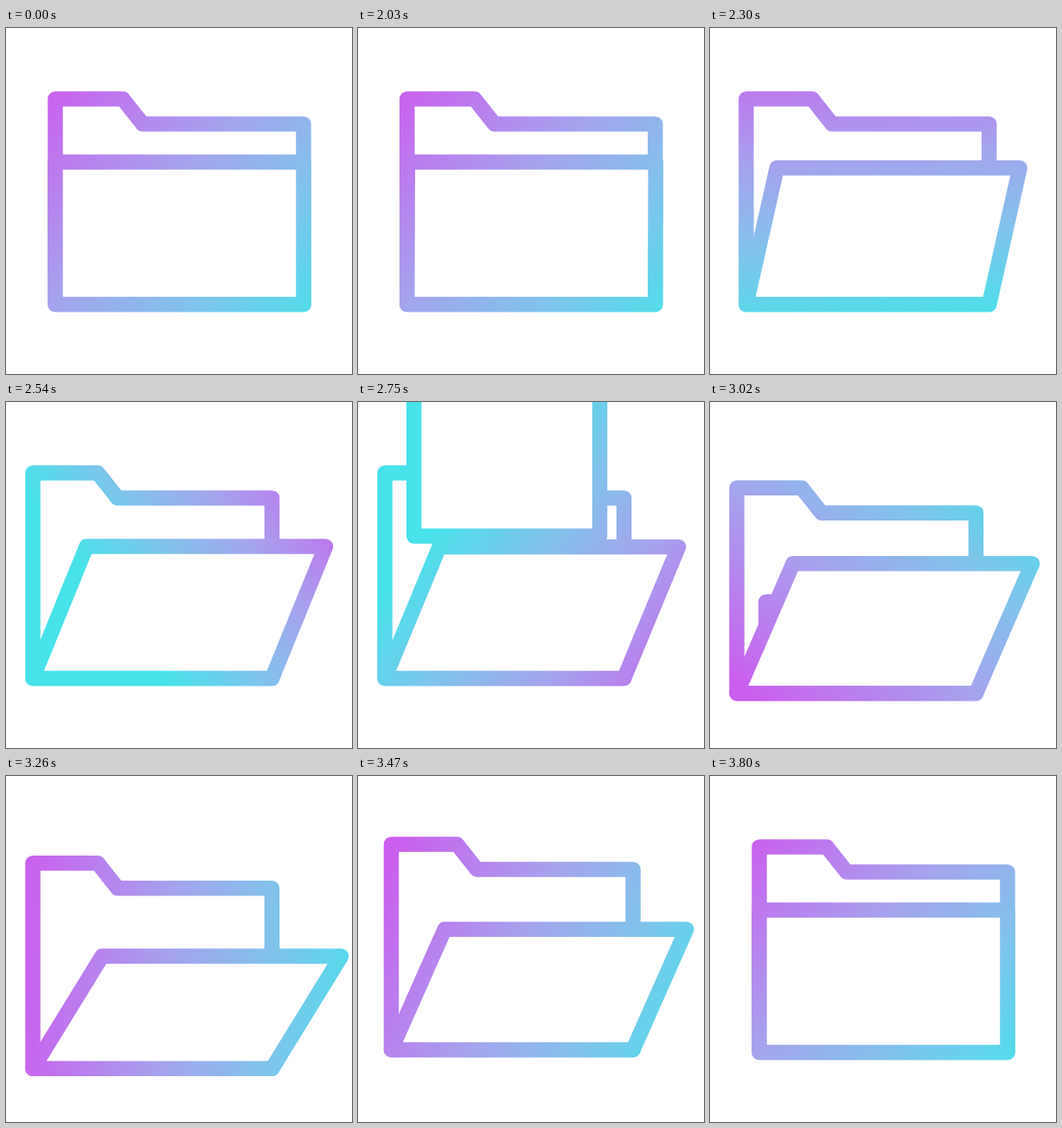
Animation of 400 by 400 pixels, one loop 3830 ms. Source, as an HTML page with a canvas:

```html
<!DOCTYPE html>
<html lang="en">
<head>
<meta charset="utf-8">
<title>Folder</title>
<style>
  html, body { margin: 0; width: 100%; height: 100%; overflow: hidden; background: #fff; }
  canvas { display: block; width: 400px; height: 400px; }
</style>
</head>
<body>
<canvas id="stage" width="400" height="400"></canvas>
<script>
const ctx = document.getElementById('stage').getContext('2d');
const LOOP = 3830, START = 2030, STEP = 30;

// Smooth curve through [time, value] keys that never overshoots between them
function track(...keys) {
  const last = keys.length - 1;
  const rate = i => (keys[i + 1][1] - keys[i][1]) / (keys[i + 1][0] - keys[i][0]);
  const slope = keys.map((k, i) => {
    if (i === 0 || i === last) return 0;
    const a = rate(i - 1), b = rate(i);
    return a * b > 0 ? 2 * a * b / (a + b) : 0;
  });
  return t => {
    if (t <= keys[0][0]) return keys[0][1];
    if (t >= keys[last][0]) return keys[last][1];
    let i = 0;
    while (t > keys[i + 1][0]) i++;
    const [t0, v0] = keys[i], [t1, v1] = keys[i + 1];
    const h = t1 - t0, u = (t - t0) / h, w = 1 - u;
    return w * w * ((1 + 2 * u) * v0 + u * h * slope[i]) +
           u * u * ((1 + 2 * w) * v1 - w * h * slope[i + 1]);
  };
}

const open = track([2000, 0], [2540, 1], [3320, 1], [3650, 0.19], [3800, 0]);
const drop = track([2880, 0], [3020, 17.3], [3110, 24.5], [3260, 18.8], [3520, -5], [3650, -3], [3800, 0]);
const lean = track([2000, 0], [2540, 62], [2750, 63], [3020, 65], [3080, 67], [3260, 80], [3320, 84], [3650, 19], [3800, 0]);
const rise = track([2000, 164.5], [2540, 152.5], [2750, 152], [3020, 150], [3260, 130], [3320, 125], [3650, 161], [3800, 164.5]);
const sheet = track([2540, -50], [2570, -30], [2750, 155], [3020, 461], [3170, 640]);

const angle = track([2000, 44], [2540, 144], [2750, 217], [3020, 310], [3260, 364], [3800, 404]);
const span = track([2000, 423], [2540, 300], [2750, 367], [3020, 400], [3260, 420], [3800, 423]);
const shift = track([2000, -15], [2540, -37], [2750, -32], [3020, -28], [3260, -11], [3800, -15]);

function paint(t) {
  const a = angle(t) * Math.PI / 180, dx = Math.cos(a), dy = Math.sin(a);
  const from = shift(t) - span(t) / 2, to = from + span(t);
  const g = ctx.createLinearGradient(235 + dx * from, 200 + dy * from, 235 + dx * to, 200 + dy * to);
  g.addColorStop(0, '#cb5eee');
  g.addColorStop(0.42, '#a5a3ed');
  g.addColorStop(0.7, '#80c3eb');
  g.addColorStop(1, '#47e2ea');
  return g;
}

function shape(points) {
  ctx.beginPath();
  for (const [x, y] of points) ctx.lineTo(x, y);
  ctx.closePath();
  ctx.fill();
  ctx.stroke();
}

function draw(t) {
  const o = open(t), y = drop(t), base = 319.5 + y;
  const mix = (shut, wide) => shut + (wide - shut) * o;
  const left = mix(57, 31), right = mix(344, 307.5);
  const tab = mix(135, 106), notch = mix(158, 129);

  ctx.fillStyle = '#fff';
  ctx.fillRect(0, 0, 400, 400);
  ctx.strokeStyle = paint(t);
  ctx.lineWidth = 17.5;
  ctx.lineJoin = 'round';

  shape([[left, 82 + y], [tab, 82 + y], [notch, 111 + y], [right, 111 + y], [right, base], [left, base]]);

  const low = sheet(t), high = low - 230;
  if (t > 2540 && high < base) {
    ctx.save();
    ctx.beginPath();
    ctx.rect(0, 0, 400, base);
    ctx.clip();
    shape([[64.7, high], [279.5, high], [279.5, low], [64.7, low]]);
    ctx.restore();
  }

  const k = lean(t), top = base - rise(t);
  shape([[left + k, top], [right + k, top], [right, base], [left, base]]);
}

const begin = performance.now();
function tick() {
  const t = (performance.now() - begin) % LOOP;
  draw(t < START ? 0 : START + Math.floor((t - START) / STEP) * STEP);
  requestAnimationFrame(tick);
}
tick();
</script>
</body>
</html>
```
